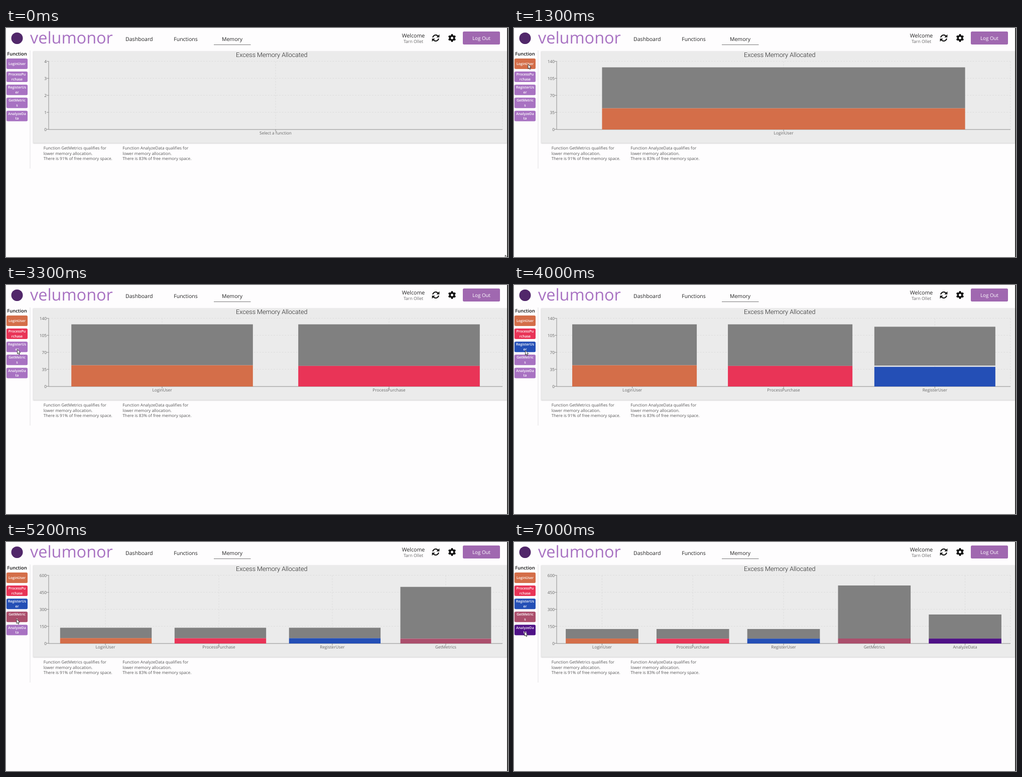
An HTML page with a canvas that plays this animation: 1000x458 px, repeating every 7200 ms.

```html
<!DOCTYPE html>
<html lang="en">
<head>
<meta charset="utf-8">
<title>Memory dashboard</title>
<style>
  html, body { margin: 0; width: 100%; height: 100%; overflow: hidden; background: #fefdfe; }
  canvas { display: block; width: 100%; height: 100%; }
</style>
</head>
<body>
<canvas id="stage" width="1000" height="458"></canvas>
<script>
const ctx = document.getElementById('stage').getContext('2d');
const LOOP = 7200, GROW = 400;
const UI = '"Open Sans", "Noto Sans", sans-serif';
const PLOT = { left: 85, right: 989, top: 67, bottom: 203 };
const PURPLE = '#a872c2';

// Each function is clicked at `at` and then joins the chart.
const functions = [
  { name: 'LoginUser', lines: ['LoginUser'], color: '#d46e49', used: 43.7, total: 128, at: 888 },
  { name: 'ProcessPurchase', lines: ['ProcessPu', 'rchase'], color: '#e93457', used: 42.4, total: 128, at: 2167 },
  { name: 'RegisterUser', lines: ['RegisterUs', 'er'], color: '#244fb6', used: 43, total: 128, at: 3720 },
  { name: 'GetMetrics', lines: ['GetMetric', 's'], color: '#ab4f6c', used: 44, total: 512, at: 4884 },
  { name: 'AnalyzeData', lines: ['AnalyzeDa', 'ta'], color: '#4f1187', used: 43.5, total: 256, at: 6180 }
];

// Pointer moves: start, end, destination.
const pointerStart = [994.5, 454];
const pointerMoves = [
  [40, 790, 28, 72.5],
  [1500, 2050, 23, 99.5],
  [2700, 3420, 22.5, 131],
  [4150, 4520, 21, 154],
  [5450, 6020, 21, 179]
];

const mix = (a, b, k) => a + (b - a) * k;
const clamp = k => Math.min(1, Math.max(0, k));
const smooth = k => k * k * (3 - 2 * k);

// cubic-bezier(.25, .1, .25, 1)
function ease(x) {
  if (x <= 0 || x >= 1) return clamp(x);
  const curve = (s, a, b) => 3 * (1 - s) ** 2 * s * a + 3 * (1 - s) * s * s * b + s ** 3;
  let lo = 0, hi = 1;
  for (let i = 0; i < 24; i++) {
    const mid = (lo + hi) / 2;
    if (curve(mid, .25, .25) < x) lo = mid; else hi = mid;
  }
  return curve(lo, .1, 1);
}

function text(str, x, y, size, color, { align = 'left', weight = 400, family = UI } = {}) {
  ctx.font = `${weight} ${size}px ${family}`;
  ctx.textRendering = 'geometricPrecision';
  ctx.textAlign = align;
  ctx.fillStyle = color;
  ctx.fillText(str, x, y);
}

function rect(x, y, w, h, color) {
  ctx.fillStyle = color;
  ctx.fillRect(x, y, w, h);
}

function roundRect(x, y, w, h, r, color) {
  ctx.fillStyle = color;
  ctx.beginPath();
  ctx.roundRect(x, y, w, h, r);
  ctx.fill();
}

function line(x1, y1, x2, y2, color, width = 1) {
  ctx.strokeStyle = color;
  ctx.lineWidth = width;
  ctx.beginPath();
  ctx.moveTo(x1, y1);
  ctx.lineTo(x2, y2);
  ctx.stroke();
}

function polygon(points) {
  ctx.beginPath();
  points.forEach(([x, y]) => ctx.lineTo(x, y));
  ctx.closePath();
}

function drawRefresh(x, y) {
  ctx.save();
  ctx.translate(x, y);
  ctx.strokeStyle = ctx.fillStyle = '#111';
  ctx.lineWidth = 2.2;
  for (let i = 0; i < 2; i++) {
    ctx.beginPath();
    ctx.arc(0, 0, 6, Math.PI * 1.06, Math.PI * 1.79);
    ctx.stroke();
    polygon([[7.4, -7.3], [7.4, -1.2], [1.3, -1.2]]);
    ctx.fill();
    ctx.rotate(Math.PI);
  }
  ctx.restore();
}

function drawGear(x, y) {
  ctx.save();
  ctx.translate(x, y);
  ctx.fillStyle = '#111';
  ctx.beginPath();
  ctx.arc(0, 0, 5.9, 0, Math.PI * 2);
  ctx.fill();
  for (let i = 0; i < 6; i++) {
    ctx.beginPath();
    ctx.roundRect(-1.9, -7.7, 3.8, 4, .6);
    ctx.fill();
    ctx.rotate(Math.PI / 3);
  }
  ctx.fillStyle = '#fefdfe';
  ctx.beginPath();
  ctx.arc(0, 0, 2.5, 0, Math.PI * 2);
  ctx.fill();
  ctx.restore();
}

function drawHeader() {
  ctx.fillStyle = '#51276a';
  ctx.beginPath();
  ctx.arc(22, 20.5, 11.5, 0, Math.PI * 2);
  ctx.fill();
  text('velumonor', 48, 30.5, 32.4, PURPLE);

  text('Dashboard', 238, 25.7, 10.6, '#222');
  text('Functions', 334.3, 25.7, 10.5, '#222');
  text('Memory', 430, 25.7, 10.5, '#222');
  line(414, 33.5, 487.5, 33.5, '#777');

  text('Welcome', 811.5, 19.2, 10.65, '#222', { align: 'center' });
  text('Tarn Ollet', 811.5, 30, 8.7, '#666', { align: 'center' });
  drawRefresh(856, 20);
  drawGear(888.5, 20);
  roundRect(910, 7, 74, 26, 2.5, '#a068b0');
  text('Log Out', 947, 23.7, 9.8, '#fff', { align: 'center' });
}

function drawSidebar(count) {
  text('Function', 22, 55.3, 9.4, '#111', { align: 'center', weight: 600 });
  functions.forEach((f, i) => {
    const top = 61 + i * 26.1;
    roundRect(1, top, 42, 21, 2.5, i < count ? f.color : PURPLE);
    const first = f.lines.length > 1 ? 8.1 : 13.2;
    f.lines.forEach((part, k) =>
      text(part, 22, top + first + k * 9.5, 7, '#fff', { align: 'center', weight: 600 }));
  });
  line(48, 45, 48, 281, '#e2dfe3');
}

function drawTips() {
  const tip = (x, name, free) => [
    `Function ${name} qualifies for`,
    'lower memory allocation.',
    `There is ${free}% of free memory space.`
  ].forEach((row, i) => text(row, x, 243.3 + i * 10.5, 8.25, '#555'));
  tip(74.7, 'GetMetrics', 91);
  tip(232.3, 'AnalyzeData', 83);
}

const axisMax = count => count === 0 ? 4 : count < 4 ? 140 : 600;

// Settled geometry of bar i in a chart of `count` bars.
function barBox(i, count) {
  const band = (PLOT.right - PLOT.left) / count;
  const unit = (PLOT.bottom - PLOT.top) / axisMax(count);
  return {
    x: PLOT.left + band * (i + .1),
    w: band * .8,
    used: functions[i].used * unit,
    total: functions[i].total * unit
  };
}

function drawBar(i, count, k) {
  const box = barBox(i, count);
  let grow = 1;
  if (i === count - 1) {
    grow = k;
  } else {
    const before = barBox(i, count - 1);
    for (const key in box) box[key] = mix(before[key], box[key], k);
  }
  const usedHeight = box.used * grow;
  const freeHeight = (box.total - box.used) * grow;
  rect(box.x, PLOT.bottom - box.used - freeHeight, box.w, freeHeight, '#808080');
  rect(box.x, PLOT.bottom - usedHeight, box.w, usedHeight, functions[i].color);
}

function drawChart(count, k) {
  ctx.save();
  ctx.shadowColor = 'rgba(0,0,0,.18)';
  ctx.shadowBlur = 2;
  ctx.shadowOffsetY = 1;
  rect(54.4, 46.4, 943.6, 183.4, '#ebebeb');
  ctx.restore();
  text('Excess Memory Allocated', 529.3, 58.3, 12.6, '#222',
    { align: 'center', weight: 300, family: 'Roboto, sans-serif' });

  const { left, right, top, bottom } = PLOT;
  const labels = count ? functions.slice(0, count).map(f => f.name) : ['Select a function'];
  const centers = labels.map((_, i) => left + (right - left) * (i + .5) / labels.length);
  const tickY = i => bottom - (bottom - top) * i / 4;

  ctx.setLineDash([2.8, 2.8]);
  for (let i = 1; i <= 4; i++) line(left, tickY(i) - .5, right, tickY(i) - .5, '#d9d9d9', .8);
  [...centers, right].forEach(x => line(x, top, x, bottom, '#d9d9d9', .8));
  ctx.setLineDash([]);

  line(left, top - .5, left, bottom, '#858585', .9);
  line(left, bottom, right, bottom, '#858585', .9);
  for (let i = 0; i <= 4; i++) {
    line(left - 4, tickY(i) - .3, left, tickY(i) - .3, '#858585', .9);
    text(axisMax(count) * i / 4, 81, tickY(i) + 2.9, 8.3, '#666', { align: 'right' });
  }
  centers.forEach((x, i) => {
    line(x, bottom, x, bottom + 4, '#858585', .9);
    text(labels[i], x, 213, 8.3, '#666', { align: 'center' });
  });
  for (let i = 0; i < count; i++) drawBar(i, count, k);
}

function drawPointer(t) {
  let [x, y] = pointerStart;
  for (const [from, to, toX, toY] of pointerMoves) {
    const k = smooth(clamp((t - from) / (to - from)));
    x = mix(x, toX, k);
    y = mix(y, toY, k);
  }
  ctx.save();
  ctx.translate(x, y);
  polygon([[0, 0], [0, 9], [2, 7.2], [3.4, 10.3], [4.9, 9.6], [3.5, 6.6], [6.2, 6.3]]);
  ctx.fillStyle = '#fff';
  ctx.fill();
  ctx.strokeStyle = '#222';
  ctx.lineWidth = .9;
  ctx.stroke();
  ctx.restore();
}

function draw(t) {
  const count = functions.filter(f => t >= f.at).length;
  const k = count ? ease((t - functions[count - 1].at) / GROW) : 0;
  rect(0, 0, 1000, 458, '#fefdfe');
  drawHeader();
  drawSidebar(count);
  drawChart(count, k);
  drawTips();
  rect(998.3, 0, 1.7, 458, '#151515');
  drawPointer(t);
}

const start = performance.now();
function tick() {
  draw((performance.now() - start) % LOOP);
  requestAnimationFrame(tick);
}
tick();
</script>
</body>
</html>
```
